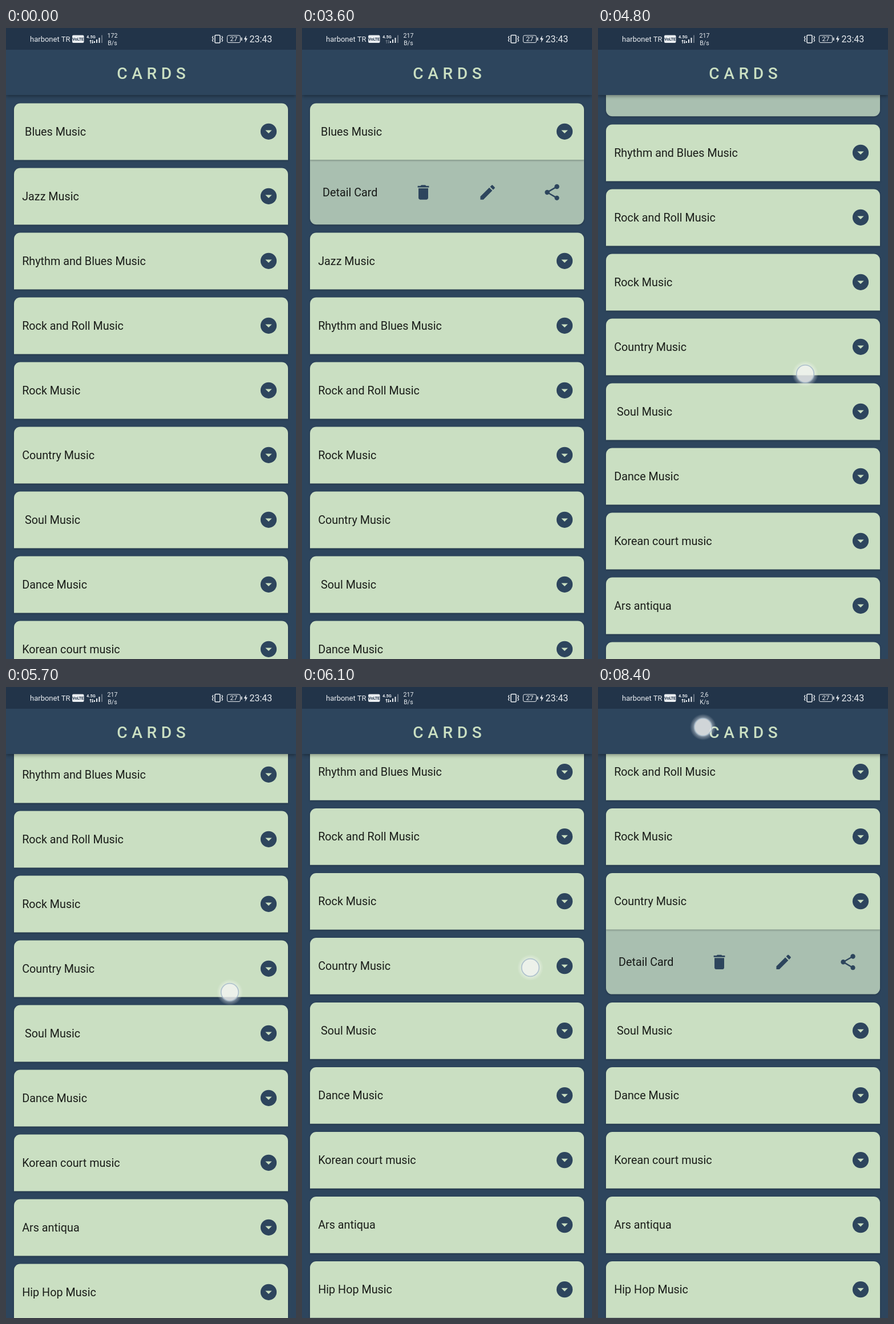
Recreate the animation shown at these times as an HTML page. Size 508 by 1102 pixels, loop 8500 ms.

```html
<!DOCTYPE html>
<html lang="en">
<head>
<meta charset="utf-8">
<title>Cards</title>
<style>
html, body { margin: 0; width: 100%; height: 100%; overflow: hidden; background: #2d455d; }
svg { display: block; width: 508px; height: 1102px; font-family: Roboto, sans-serif; }
text { white-space: pre; }
.head, .panel { filter: drop-shadow(0 1px 1.5px rgba(0, 0, 0, .28)); }
.head { fill: #cadfc2; }
.panel { fill: #a9bfb0; }
.label { font-size: 19.76px; fill: rgba(0, 0, 0, .87); }
.icon { fill: #2d455d; }
.bar { fill: #2d455d; filter: drop-shadow(0 2px 3px rgba(0, 0, 0, .38)); }
.title { font-size: 28.2px; font-weight: 500; letter-spacing: 7.6px; fill: #cadfc2; }
.status { fill: #e9edf1; }
.speed { font-size: 10.6px; text-anchor: middle; }
</style>
</head>
<body>
<svg viewBox="0 0 508 1102">
  <defs>
    <radialGradient id="halo">
      <stop offset=".6" stop-color="#fff" stop-opacity=".5"/>
      <stop offset="1" stop-color="#fff" stop-opacity="0"/>
    </radialGradient>
    <g id="arrow">
      <circle r="14.1" class="icon"/>
      <path d="M-5.7-2.4H5.7L0 3.2z" fill="#cadfc2"/>
    </g>
  </defs>
  <rect width="508" height="1102" fill="#2d455d"/>

  <g id="list">
    <g id="detail">
      <path class="panel" d="M14 0H494V101.8a11 11 0 0 1-11 11H25a11 11 0 0 1-11-11z"/>
      <text class="label" x="36" y="63.4">Detail Card</text>
      <g class="icon" transform="translate(0 39.6)">
        <path transform="translate(195.6) scale(1.411)" d="M6 19c0 1.1.9 2 2 2h8c1.1 0 2-.9 2-2V7H6v12zM19 4h-3.5l-1-1h-5l-1 1H5v2h14V4z"/>
        <path transform="translate(308.2) scale(1.411)" d="M3 17.25V21h3.75L17.81 9.94l-3.75-3.75L3 17.25zM20.71 7.04c.39-.39.39-1.02 0-1.41l-2.34-2.34c-.39-.39-1.02-.39-1.41 0l-1.83 1.83 3.75 3.75 1.83-1.83z"/>
        <path transform="translate(421.1) scale(1.411)" d="M18 16.08c-.76 0-1.44.3-1.96.77L8.91 12.7c.05-.23.09-.46.09-.7s-.04-.47-.09-.7l7.05-4.11c.54.5 1.25.81 2.04.81 1.66 0 3-1.34 3-3s-1.34-3-3-3-3 1.34-3 3c0 .24.04.47.09.7L8.04 9.81C7.5 9.31 6.79 9 6 9c-1.66 0-3 1.34-3 3s1.34 3 3 3c.79 0 1.5-.31 2.04-.81l7.12 4.16c-.05.21-.08.43-.08.65 0 1.61 1.31 2.92 2.92 2.92s2.92-1.31 2.92-2.92-1.31-2.92-2.92-2.92z"/>
      </g>
    </g>
  </g>

  <rect class="bar" width="508" height="117"/>
  <rect width="508" height="38" fill="#223449"/>
  <text class="title" x="194.2" y="88.6">CARDS</text>

  <g class="status">
    <text x="42" y="24" font-size="13">harbonet TR</text>
    <rect x="116" y="12.5" width="20.5" height="13.5" rx="2"/>
    <text x="126.2" y="22" font-size="7" font-weight="700" text-anchor="middle" fill="#223449">VoLTE</text>
    <text x="141" y="18" font-size="7.4" font-weight="700">4.5G</text>
    <path id="traffic" d="M147.6 27v-4h-1.6l2.2-2.4 2.2 2.4h-1.6v4zM151 21v4h-1.2l1.8 2.2 1.8-2.2h-1v-4z"/>
    <path d="M154 23h2v3h-2zM158 20h2v6h-2zM162.500 17h2v9h-2z"/>
    <path d="M167 12.500h2v13.500h-2z" opacity=".35"/>
    <text class="speed" id="amount" x="186.500" y="17"></text>
    <text class="speed" id="unit" x="186.500" y="30"></text>

    <rect x="366" y="12.500" width="9" height="13.500" rx="1.500" fill="none" stroke="#e9edf1" stroke-width="1.600"/>
    <path d="M363 14l-1.500 2.500 1.500 2.500-1.500 2.500 1.500 2.500M378 14l1.500 2.500-1.500 2.500 1.500 2.500-1.500 2.500" fill="none" stroke="#e9edf1" stroke-width="1.400"/>
    <rect x="387.500" y="13" width="23" height="12.500" rx="2.500" fill="none" stroke="#e9edf1"/>
    <rect x="411.800" y="16.500" width="1.800" height="5.500" rx=".6"/>
    <text x="399" y="23.400" font-size="11.500" text-anchor="middle">27</text>
    <path d="M420.800 13l-4 7h2.700l-.8 5.500 4.300-7.300h-2.800z"/>
    <text x="426.500" y="25" font-size="16">23:43</text>
  </g>

  <g id="touch">
    <circle r="23" fill="url(#halo)"/>
    <circle r="15.300" fill="#f1f3f0" fill-opacity=".64" stroke="#a3b8c8" stroke-opacity=".8" stroke-width="1.800"/>
  </g>
</svg>
<script>
const LOOP = 8500, STEP = 100, TOP = 131.6, PITCH = 113, HEAD = 98.8;
const $ = id => document.getElementById(id);
const names = [' Blues Music', 'Jazz Music', 'Rhythm and Blues Music', 'Rock and Roll Music',
  'Rock Music', 'Country Music', ' Soul Music', 'Dance Music', 'Korean court music',
  'Ars antiqua', 'Hip Hop Music'];

const cards = names.map(name => {
  const g = document.createElementNS('http://www.w3.org/2000/svg', 'g');
  g.innerHTML = `<path class="head" d="M14 ${HEAD}V11a11 11 0 0 1 11-11H483a11 11 0 0 1 11 11V${HEAD}z"/>
    <text class="label" x="28.2" y="56.3">${name}</text>
    <use href="#arrow" x="460" y="49.2"/>`;
  $('list').append(g);
  return g;
});

// Each row is a time followed by values
const scroll = [[4500, 0], [4600, 95], [4700, 210], [4800, 302], [4900, 341], [5000, 357],
  [5100, 364], [5200, 367], [5700, 367], [5800, 371.6]];
const touches = [
  [[1200, 465, 194], [1400, 465, 194]],
  [[2000, 469, 188], [2300, 469, 188]],
  [[2900, 466, 190], [3100, 466, 190]],
  [[4500, 336, 900], [4600, 345, 811], [4700, 355, 696], [4800, 363, 604], [4900, 366, 560]],
  [[5700, 392, 533], [5900, 397, 508], [6100, 400, 490], [6400, 400, 490]],
  [[6800, 462, 490], [7200, 462, 490]],
  [[8400, 184, 70], [8500, 184, 70]]
];
const speeds = [[0, '172', 'B/s'], [600, '3,9', 'K/s'], [3600, '217', 'B/s'], [6800, '2,6', 'K/s']];

function sample(track, t) {
  const next = track.findIndex(row => row[0] > t);
  if (next === 0) return track[0].slice(1);
  if (next < 0) return track.at(-1).slice(1);
  const a = track[next - 1], b = track[next], k = (t - a[0]) / (b[0] - a[0]);
  return a.slice(1).map((v, i) => v + (b[i + 1] - v) * k);
}

function openCard(t, offset) {
  if (t >= 6900) return 5;
  if (offset > 226) return 1;
  return t >= 3000 || (t >= 1300 && t < 2100) ? 0 : -1;
}

const place = (el, x, y) => el.setAttribute('transform', `translate(${x} ${y})`);
const show = (el, on) => el.setAttribute('visibility', on ? 'visible' : 'hidden');

function render(t) {
  const [offset] = sample(scroll, t);
  const open = openCard(t, offset);
  const cardY = i => TOP + PITCH * (i + (open >= 0 && i > open)) - offset;
  cards.forEach((card, i) => place(card, 0, cardY(i)));
  show($('detail'), open >= 0);
  if (open >= 0) place($('detail'), 0, cardY(open) + HEAD);

  const touch = touches.find(p => t >= p[0][0] && t < p.at(-1)[0]);
  show($('touch'), touch);
  if (touch) place($('touch'), ...sample(touch, t));

  const [, amount, unit] = speeds.findLast(row => row[0] <= t);
  $('amount').textContent = amount;
  $('unit').textContent = unit;
  const idle = (t >= 2900 && t < 4500) || (t >= 6800 && t < 8000);
  $('traffic').setAttribute('opacity', idle ? .35 : 1);
}

function frame() {
  const t = performance.now() % LOOP;
  render(Math.floor(t / STEP) * STEP);
  requestAnimationFrame(frame);
}
frame();
</script>
</body>
</html>
```
